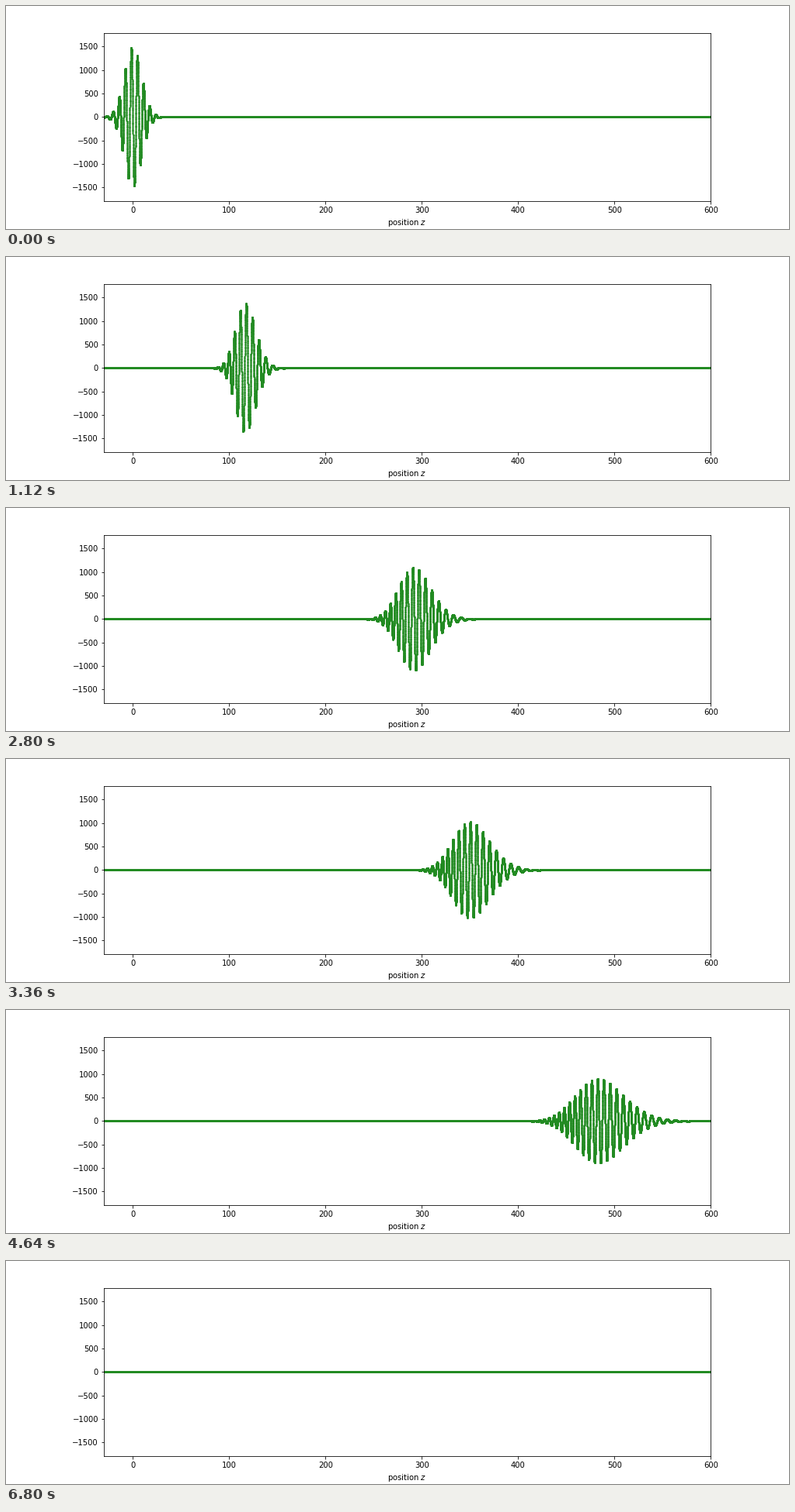
Recreate the animation shown at these times as a matplotlib script. Size 1008x288 px, loop 8000 ms.

```python
import numpy as np
import matplotlib.pyplot as plt
from matplotlib.animation import FuncAnimation

FRAMES, LAST = 200, 170      # the picture rests after step LAST
Z_MIN, Z_MAX = -30, 600
PEAK = 1492                  # height of the envelope at the start
SIGMA = 0.4644               # spectral width
OMEGA = 7.862                # carrier frequency, rad per step
K1, K2 = 0.2397, 0.025       # inverse group velocity and its dispersion

# Gaussian spectrum around the carrier, with k(omega) quadratic
detune = np.linspace(-4.5 * SIGMA, 4.5 * SIGMA, 300)
weight = np.exp(-detune**2 / (2 * SIGMA**2))
weight *= PEAK / weight.sum()
k = 1 + K1 * detune + K2 / 2 * detune**2

z = np.linspace(Z_MIN, Z_MAX, 6301)
waves = np.exp(-1j * np.outer(z, k))


def packet(step):
    """Positions and field values, sampled finely where the wave is alive."""
    psi = waves @ (weight * np.exp(1j * (OMEGA + detune) * step))
    field = psi.imag
    busy = z[np.abs(psi) > 2]
    if busy.size < 2:
        return z, field
    fine = np.arange(busy[0], busy[-1], 0.01)
    return (np.concatenate([z, fine]),
            np.concatenate([field, np.interp(fine, z, field)]))


fig, ax = plt.subplots(figsize=(14, 4), dpi=72)
fig.subplots_adjust(left=0.125, right=0.9, bottom=0.125, top=0.88)
ax.set_xlim(Z_MIN, Z_MAX)
ax.set_ylim(-1.2 * PEAK, 1.2 * PEAK)
ax.set_xlabel("position $z$")
dots, = ax.plot([], [], ".", ms=2, color="forestgreen")


def draw(i):
    dots.set_data(*packet(min(i, LAST)))
    return dots,


anim = FuncAnimation(fig, draw, frames=FRAMES, interval=40,
                     init_func=lambda: draw(0), repeat=True, repeat_delay=0)
plt.show()
```
